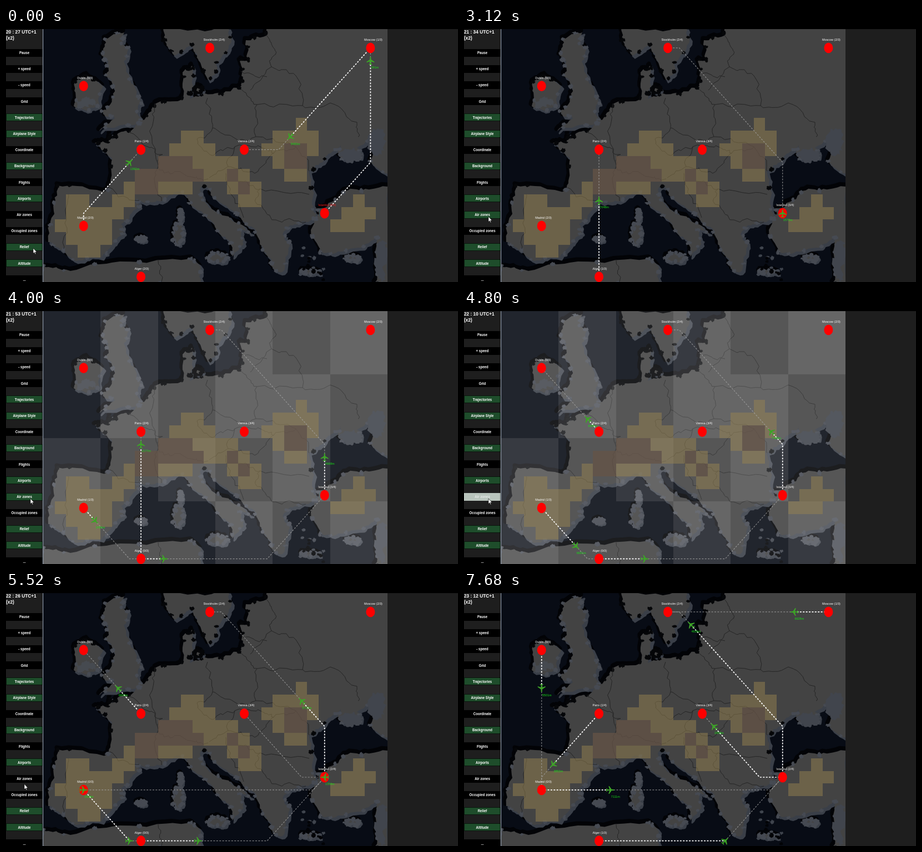
An HTML page with a canvas for the animation above (7.76 s loop, 814 by 458 pixels).

```html
<!DOCTYPE html>
<html lang="en">
<head>
<meta charset="utf-8">
<title>Air traffic</title>
<style>
html, body { margin: 0; width: 100%; height: 100%; overflow: hidden; background: #1e1e1e; }
canvas { display: block; width: 814px; height: 458px; }
</style>
</head>
<body>
<canvas id="stage" width="814" height="458"></canvas>
<script>
const W = 814, H = 458, LOOP = 7760, STEP = 80;
const LEFT = 67, RIGHT = 687, CW = 620 / 30, CH = 22.93, TOP = 1.5;
const ctx = document.getElementById('stage').getContext('2d');
const px = c => LEFT + CW * (c + 0.5) + 0.4;
const py = r => TOP + CH * (r + 0.5);

// ---------- map ----------
const south = [93,284, 86,330, 76,386, 104,400, 126,420, 172,414, 197,384, 212,370, 207,354, 240,322, 237,310, 278,313,
  318,296, 340,324, 376,358, 405,388, 407,412, 428,382, 421,364, 442,370, 391,338, 354,310, 349,291];
const east = [362,286, 376,306, 424,345, 445,360, 462,400, 481,432, 498,440, 510,386, 498,372, 521,354, 559,344,
  551,318, 545,258, 574,236, 603,210, 600,232, 638,234, 632,216, 672,194, 656,240, 688,262, 688,0];
const north = [470,0, 468,14, 432,22, 436,57, 421,60, 427,92, 420,108, 376,118, 331,128, 338,86, 335,68, 318,80, 317,126,
  270,136, 262,150, 221,186, 190,200, 188,190, 183,206, 160,208, 191,236, 184,292];
const britain = [178,20, 213,8, 205,28, 219,35, 212,60, 235,120, 244,136, 237,156, 245,168, 220,175, 168,186,
  196,163, 172,150, 186,140, 196,110, 180,85, 185,60, 172,50];
const ireland = [124,97, 146,85, 175,106, 165,141, 140,147, 122,141];
const nordic = [283,0, 289,28, 304,50, 335,30, 364,94, 378,82, 379,62, 401,36, 400,0];
const turkey = [562,328, 600,304, 622,290, 688,286, 688,460, 664,460, 668,378, 640,396, 590,407, 566,404, 549,364];
const africa = [66,428, 116,438, 205,421, 332,416, 346,425, 350,460, 66,460];

// x, y, half width, half height
const isles = [[381,414,18,9], [310,371,9,20], [314,337,3,10], [548,440,17,3], [624,415,13,5], [346,111,8,6], [243,381,8,4]];

const borders = [
  [186,288, 240,311], [112,300, 106,352, 104,398], [222,186, 262,215, 282,228], [282,228, 268,280, 280,312],
  [268,136, 262,180, 276,256], [276,256, 318,262, 364,272], [363,126, 372,180, 344,200, 372,230],
  [372,180, 420,204, 450,196, 452,138, 423,110], [372,230, 412,214, 462,216, 482,226], [366,270, 400,250, 412,214],
  [400,250, 448,262, 482,226, 522,214, 546,258], [396,262, 404,290, 428,342], [418,276, 458,290, 546,300],
  [458,290, 452,318, 486,346, 540,350], [452,138, 534,140, 592,138, 632,170, 634,196], [534,140, 522,86, 478,70],
  [440,112, 478,70, 484,40, 470,14], [423,78, 470,88], [450,196, 522,214], [274,419, 280,458]
];

function random(seed) {
  return () => {
    seed = (seed * 1664525 + 1013904223) >>> 0;
    return seed / 4294967296 - 0.5;
  };
}

// midpoint displacement: turns a coarse outline into a ragged coast
function roughen(flat, closed, amount, seed) {
  const rnd = random(seed);
  let pts = [];
  for (let i = 0; i < flat.length; i += 2) pts.push([flat[i], flat[i + 1]]);
  for (let pass = 0; pass < 3; pass++) {
    const out = [];
    pts.forEach((p, i) => {
      out.push(p);
      const q = pts[i + 1] || (closed && pts[0]);
      if (!q) return;
      const d = Math.min(14, Math.hypot(q[0] - p[0], q[1] - p[1])) * amount;
      out.push([(p[0] + q[0]) / 2 + rnd() * d, (p[1] + q[1]) / 2 + rnd() * d]);
    });
    pts = out;
  }
  return pts;
}

function trace(g, pts) {
  g.beginPath();
  pts.forEach(p => g.lineTo(p[0], p[1]));
}

function oval(x, y, rx, ry) {
  const flat = [];
  for (let i = 0; i < 9; i++) flat.push(x + rx * Math.cos(i * 0.698), y + ry * Math.sin(i * 0.698));
  return flat;
}

function blob(g, x, y, rx, ry, color, seed) {
  trace(g, roughen(oval(x, y, rx, ry), true, 0.8, seed));
  g.fillStyle = color;
  g.fill();
}

function makeMap() {
  const cv = document.createElement('canvas');
  cv.width = W; cv.height = H;
  const g = cv.getContext('2d');
  g.fillStyle = '#080c15';
  g.fillRect(0, 0, W, H);
  g.lineJoin = 'round';
  const lands = [south.concat(east, north), britain, ireland, nordic, turkey, africa];
  for (const isle of isles) lands.push(oval(...isle));
  const shapes = lands.map((l, i) => roughen(l, true, 0.5, i * 97 + 11));
  const layer = (dx, dy, color, line) => {
    g.save();
    g.translate(dx, dy);
    g.fillStyle = g.strokeStyle = color;
    g.lineWidth = line;
    shapes.forEach(s => { trace(g, s); g.closePath(); g.fill(); if (line) g.stroke(); });
    g.restore();
  };
  layer(-2, -4, '#020306', 7);
  layer(4, 4, '#3a3f48', 3);
  layer(0, 0, '#434343', 0);
  // worn patches clinging to the coasts
  const rnd = random(5);
  shapes.forEach((s, n) => s.forEach((p, i) => {
    if (i % 6 === 0 && p[0] < 684 && p[1] > 4) {
      const shallow = p[1] > 290 || p[0] > 585 || n === 1 || n === 2 && p[1] > 115;
      blob(g, p[0], p[1], 4.5 + rnd() * 3, 3.5 + rnd() * 3, shallow ? '#464a52' : '#050608', i + n);
    }
  }));
  blob(g, 622, 228, 22, 12, '#41454d', 3);
  blob(g, 668, 205, 17, 24, '#41454d', 4);
  blob(g, 676, 420, 10, 38, '#41454d', 8);
  blob(g, 146, 134, 18, 9, '#464a50', 9);
  for (let i = 0; i < 20; i++) {
    blob(g, 550 + rnd() * 46, 424 + rnd() * 62, 3.5, 2.5, i % 2 ? '#3f444d' : '#020306', i + 40);
  }
  g.strokeStyle = '#252525';
  g.lineWidth = 1;
  borders.forEach((b, i) => { trace(g, roughen(b, false, 0.6, i * 31 + 7)); g.stroke(); });
  return cv;
}
const map = makeMap();

function cellRect(c, r, w, h, color) {
  const x = Math.round(LEFT + c * CW), y = Math.round(TOP + r * CH);
  ctx.fillStyle = color;
  ctx.fillRect(x, y, Math.round(LEFT + (c + w) * CW) - x, Math.round(TOP + (r + h) * CH) - y);
}

// column, row, cells wide
const hills = [
  [22,7,1], [12,8,2], [20,8,4], [11,9,4], [19,9,5], [10,10,7], [20,10,3], [8,11,10], [21,11,2], [7,12,6], [16,12,3],
  [2,13,2], [6,13,2], [17,13,2], [27,13,1], [2,14,5], [26,14,3], [1,15,5], [25,15,3], [2,16,4], [3,17,2]
];
const peaks = [[10,10,3], [8,11,6], [8,12,2], [16,11,1], [17,12,1], [21,9,2], [21,10,2]];
function drawRelief() {
  for (const [c, r, w] of hills) cellRect(c, r, w, 1, 'rgba(150,130,80,.5)');
  for (const [c, r, w] of peaks) cellRect(c, r, w, 1, 'rgba(76,60,67,.5)');
}

const zones = ['LHLHLH', 'LHLHHL', 'HLHLHL', 'HLLHLH'];
function drawZones() {
  zones.forEach((row, j) => [...row].forEach((z, i) =>
    cellRect(i * 5, j * 5, 5, 5, z === 'H' ? 'rgba(255,255,255,.19)' : 'rgba(255,255,255,.1)')));
}

// ---------- traffic ----------
const airports = [
  ['Stockholm', 14, 1, 2, 4], ['Moscow', 28, 1, 1, 3], ['Dublin', 3, 4, 0, 3], ['Paris', 8, 9, 1, 4],
  ['Vienna', 17, 9, 2, 4], ['Istanbul', 24, 14, 4, 4], ['Madrid', 3, 15, 2, 3], ['Alger', 8, 19, 2, 3]
].map(([name, c, r, count, max]) => ({ name, c, r, count, max }));
const port = Object.fromEntries(airports.map(a => [a.name, [a.c, a.r]]));

function flight(start, from, turns, to, ...alts) {
  const cells = [port[from]];
  for (const [x, y] of [...turns, port[to]]) {
    let [c, r] = cells[cells.length - 1];
    while (c !== x || r !== y) {
      c += Math.sign(x - c);
      r += Math.sign(y - r);
      cells.push([c, r]);
    }
  }
  const last = cells.length - 1;
  return { start, from, to, cells, last, end: start + last, alts: [[0, 0], ...alts, [last, 0]] };
}

// first tick, origin, turning cells, destination, then [ticks flown, metres]
const flights = [
  flight(-13, 'Madrid', [[3,14]], 'Paris', [5.42, 1393]),
  flight(-20, 'Istanbul', [[28,10]], 'Moscow', [12.42, 391]),
  flight(-15, 'Moscow', [[20,9]], 'Vienna', [7.42, 8483]),
  flight(-7, 'Alger', [], 'Paris', [3.11, 7504], [7.18, 7026]),
  flight(-1, 'Istanbul', [[24,10], [15,1]], 'Stockholm', [0.99, 1570], [5.07, 7486], [6.82, 8730], [12.06, 4635]),
  flight(0, 'Alger', [[19,19]], 'Istanbul', [4, 7200]),
  flight(1, 'Madrid', [[7,19]], 'Alger', [3.07, 6695]),
  flight(3, 'Paris', [], 'Dublin', [1.07, 6097], [2.82, 6895]),
  flight(5, 'Istanbul', [[22,14]], 'Vienna', [0.82, 1365], [6.06, 1893]),
  flight(5, 'Madrid', [[23,15]], 'Istanbul', [0.82, 1702], [6.06, 7113]),
  flight(8, 'Moscow', [], 'Stockholm', [3.06, 6632]),
  flight(8, 'Dublin', [], 'Madrid', [3.06, 5504]),
  flight(7, 'Paris', [[3,14]], 'Madrid', [4.06, 3855])
];

function altitude(f, s) {
  const i = Math.max(1, f.alts.findIndex(a => a[0] >= s));
  const [a, b] = [f.alts[i - 1], f.alts[i]];
  return Math.round(a[1] + (b[1] - a[1]) * (s - a[0]) / (b[0] - a[0]));
}

// the stage is slightly taller than wide, lettering included
function text(str, x, y, size, color, { bold = false, align = 'left' } = {}) {
  ctx.save();
  ctx.translate(x, y);
  ctx.scale(1, 1.12);
  ctx.font = `${bold ? 'bold ' : ''}${size}px "Liberation Sans", Arial, sans-serif`;
  ctx.textAlign = align;
  ctx.textBaseline = 'alphabetic';
  ctx.fillStyle = color;
  ctx.fillText(str, 0, size * 0.35);
  ctx.restore();
}

function route(cells, color, width) {
  if (cells.length < 2) return;
  ctx.setLineDash([3, 2.4]);
  ctx.strokeStyle = color;
  ctx.lineWidth = width;
  trace(ctx, cells.map(([c, r]) => [px(c), py(r)]));
  ctx.stroke();
  ctx.setLineDash([]);
}

const hull = [[7,0], [6,1], [2,1.1], [-2,7], [-3.4,7], [-1.6,1], [-5,0.9], [-6.6,3], [-7.6,3], [-6.8,0]];
const plane = [...hull, ...hull.map(([x, y]) => [x, -y]).reverse()];
function drawPlane(x, y, angle) {
  ctx.save();
  ctx.translate(x, y);
  ctx.rotate(angle);
  ctx.fillStyle = '#3da327';
  trace(ctx, plane);
  ctx.fill();
  ctx.restore();
}

function drawTraffic(k) {
  const time = (k - 39.05) / 5.15, tick = Math.floor(time);
  const active = flights.filter(f => tick >= f.start && tick < f.end);
  for (const f of active) {
    const n = tick - f.start;
    route(f.cells.slice(n), 'rgba(165,165,165,.75)', 1.2);
    route(f.cells.slice(0, n + 1), '#fff', 1.7);
  }
  for (const a of airports) {
    const x = px(a.c), y = py(a.r);
    let count = a.count;
    for (const f of flights) {
      if (f.start > -8 && f.start <= tick && f.from === a.name) count--;
      if (f.end <= tick && f.to === a.name) count++;
    }
    ctx.fillStyle = '#f00';
    ctx.beginPath();
    ctx.ellipse(x, y, 8, 9.4, 0, 0, 7);
    ctx.fill();
    text(`${a.name} (${count}/${a.max})`, x - 11.5, y - 15, 5.5, count === a.max ? '#f01818' : '#fff');
  }
  for (const f of active) {
    const n = tick - f.start, [c, r] = f.cells[n], next = f.cells[n + 1];
    const x = px(c), y = py(r);
    drawPlane(x, y, Math.atan2(next[1] - r, next[0] - c));
    text(altitude(f, time - f.start) + 'm', x + 1, y + 12, 5.5, '#16e016');
  }
}

// ---------- panel ----------
const buttons = ['Pause', '+ speed', '- speed', 'Grid', 'Trajectories', 'Airplane Style', 'Coordinate', 'Background',
  'Flights', 'Airports', 'Air zones', 'Occupied zones', 'Relief', 'Altitude', '...'];
const enabled = ['Trajectories', 'Airplane Style', 'Background', 'Airports', 'Relief', 'Altitude'];

function drawPanel(k) {
  ctx.fillStyle = '#1e1e1e';
  ctx.fillRect(0, 0, 66, H);
  ctx.fillRect(RIGHT, 0, W - RIGHT, H);
  ctx.fillStyle = '#8c97a5';
  ctx.fillRect(66, 0, 1.2, H);
  ctx.fillStyle = '#000';
  ctx.fillRect(0, 0, W, 2);
  const min = Math.floor(1227.5 + 1.72 * k);
  const clock = `${Math.floor(min / 60)} : ${String(min % 60).padStart(2, '0')} UTC+1`;
  text(clock, 0, 7, 8.3, '#fff', { bold: true });
  text('(x2)', 0, 18, 8.3, '#fff', { bold: true });
  buttons.forEach((name, i) => {
    const y = 44.6 + i * 29.2, air = name === 'Air zones';
    const pressed = air && (k === 38 || k === 60);
    const on = enabled.includes(name) || air && k >= 39 && k < 60;
    ctx.fillStyle = pressed ? '#b8c4bc' : on ? '#1e4d2b' : '#000';
    ctx.fillRect(0, Math.round(y - 7), 65.5, 14);
    if (on) {
      ctx.strokeStyle = '#0a150d';
      ctx.lineWidth = 1;
      ctx.strokeRect(0.5, Math.round(y - 7) + 0.5, 65, 13);
    }
    text(name, 33, y, 6.15, pressed ? '#e4e9e6' : '#fff', { bold: true, align: 'center' });
  });
}

// step, x, y of the pointer
const pointer = [[0,49,397], [8,49,397], [15,72,378], [22,73,377], [34,44,340], [61,44,340], [67,33,346], [72,33,347], [82,36,470], [97,36,470]];
function drawPointer(k) {
  const i = pointer.findIndex(p => p[0] > k), a = pointer[i - 1], b = pointer[i];
  let u = (k - a[0]) / (b[0] - a[0]);
  u = u * u * (3 - 2 * u);
  ctx.save();
  ctx.translate(a[1] + (b[1] - a[1]) * u, a[2] + (b[2] - a[2]) * u);
  trace(ctx, [[0,0], [0,9.5], [2.2,7.6], [3.6,11], [5,10.4], [3.6,7.2], [6.4,7]]);
  ctx.closePath();
  ctx.fillStyle = '#fff';
  ctx.fill();
  ctx.strokeStyle = '#000';
  ctx.lineWidth = 0.6;
  ctx.stroke();
  ctx.restore();
}

function draw(now) {
  const k = Math.floor((now % LOOP) / STEP);
  ctx.drawImage(map, 0, 0);
  if (k >= 40 && k <= 60) drawZones();
  drawRelief();
  drawTraffic(k);
  drawPanel(k);
  drawPointer(k);
}

let origin = null;
function loop(now) {
  if (origin === null) origin = now;
  draw(Math.max(0, now - origin));
  requestAnimationFrame(loop);
}
draw(0);
requestAnimationFrame(loop);
</script>
</body>
</html>
```
